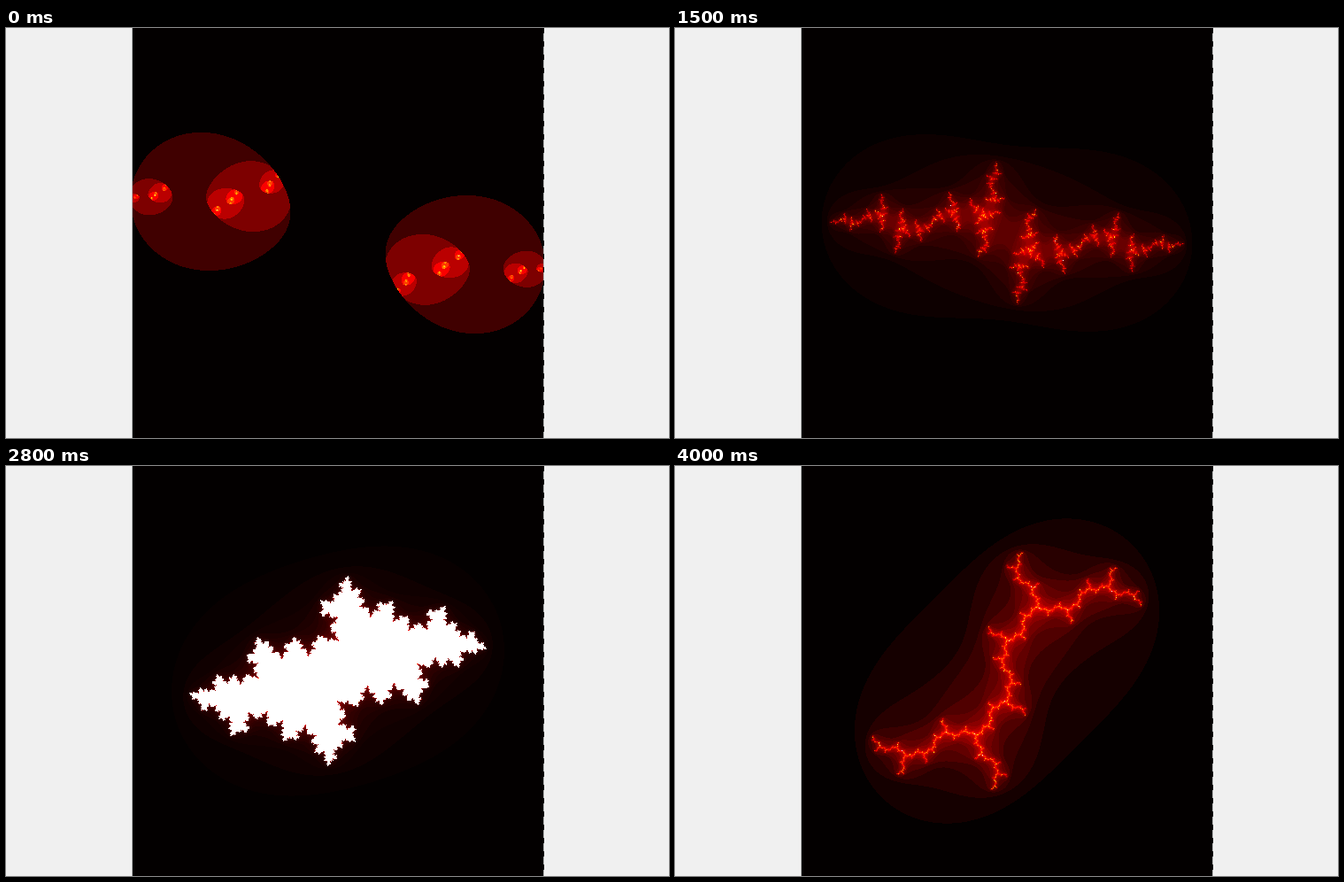
These frames come from a looping animation (749x463 px, 4.1 s). An HTML page with a canvas:

```html
<!DOCTYPE html>
<html lang="en">
<head>
<meta charset="utf-8">
<title>Julia sets</title>
<style>
  html, body { margin: 0; width: 100%; height: 100%; overflow: hidden; background: #f0f0f0; }
  canvas { position: absolute; left: 143px; top: 0; display: block; }
  .edge { position: absolute; top: 0; width: 1px; height: 463px; }
  .left { left: 142px; background: #b4b6b6; }
  .right { left: 607px; background: repeating-linear-gradient(#000 0 6px, #b4b6b6 6px 15px); }
</style>
</head>
<body>
<div class="edge left"></div>
<canvas id="view" width="464" height="463"></canvas>
<div class="edge right"></div>
<script>
const STEPS = 41, STEP_MS = 100, LIMIT = 100, UNIT = 116;
const canvas = document.getElementById('view');
const ctx = canvas.getContext('2d');
const W = canvas.width, H = canvas.height;
const cache = [];

const clamp = v => Math.max(0, Math.min(1, v));

// "Hot" colour map: black, red, yellow, white
function hot(v) {
  const n = Math.min(255, Math.floor(v * 256)) + 1;
  return [n / 96, (n - 96) / 96, (n - 192) / 64].map(c => Math.round(255 * clamp(c)));
}

// Iterations of z² + c that stay inside radius 2
function escapeCount(x, y, cx, cy) {
  let n = 0;
  while (n < LIMIT) {
    const nx = x * x - y * y + cx;
    y = 2 * x * y + cy;
    x = nx;
    if (x * x + y * y >= 4) break;
    n++;
  }
  return n;
}

function drawStep(step) {
  // c runs along a line from -2 - i to i
  const cx = (step - 40) / 20, cy = (step - 20) / 20;
  const counts = new Uint8Array(W * H);
  let peak = 0;
  for (let i = 0; i < counts.length; i++) {
    const px = i % W, py = (i - px) / W;
    const n = escapeCount((px + 0.5 - W / 2) / UNIT, (py + 0.5 - H / 2) / UNIT, cx, cy);
    counts[i] = n;
    if (n > peak) peak = n;
  }
  // Steady colour range while the set is only dust
  if (step <= 10) peak = Math.round(11 * Math.pow(18 / 11, step / 10));

  const palette = Array.from({ length: LIMIT + 1 }, (_, n) => hot(n / peak));
  const image = ctx.createImageData(W, H);
  counts.forEach((n, i) => {
    const rgb = palette[n], o = i * 4;
    image.data[o] = rgb[0];
    image.data[o + 1] = rgb[1];
    image.data[o + 2] = rgb[2];
    image.data[o + 3] = 255;
  });
  return image;
}

let shown = -1;
function tick() {
  const step = Math.floor(performance.now() / STEP_MS) % STEPS;
  if (step !== shown) {
    cache[step] = cache[step] || drawStep(step);
    ctx.putImageData(cache[step], 0, 0);
    shown = step;
  }
  requestAnimationFrame(tick);
}
tick();
</script>
</body>
</html>
```
